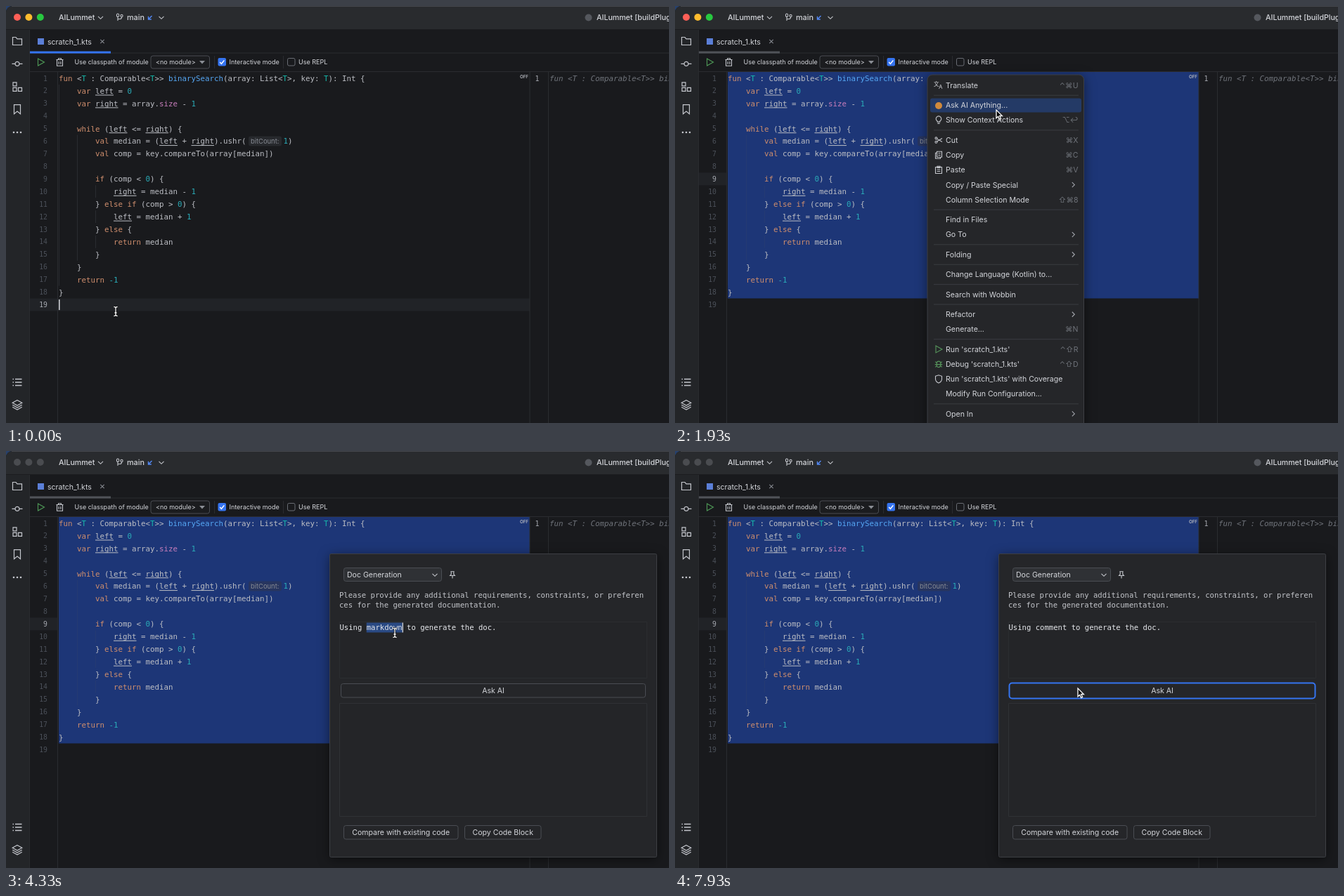
An HTML page with a canvas for the animation above (8 s loop, 943 by 594 pixels).

```html
<!DOCTYPE html>
<html>
<head>
<meta charset="utf-8">
<style>
html, body { margin: 0; width: 100%; height: 100%; overflow: hidden; background: #191a1d; }
canvas { display: block; }
</style>
</head>
<body>
<canvas id="stage" width="943" height="594"></canvas>
<script>
const g = document.getElementById('stage').getContext('2d');
const LOOP = 8000;
const T = { select: 400, menu: 1000, pick: 2070, popup: 2200, click: 3530, word: 4260, erase: 5470, show: 6930, press: 7800 };
const KEYS = [[5730, 'c'], [5800, 'o'], [6330, 'm'], [6400, 'm'], [6600, 'e'], [6730, 'n'], [6870, 't']];
const MOUSE = [[70, 156, 435], [870, 359, 245], [1070, 359, 245], [1800, 457, 148], [2070, 457, 148],
  [2730, 614, 260], [2930, 606, 259], [3600, 561, 259], [3870, 553, 259], [6930, 553, 259], [7600, 573, 338]];
const UI = 'Inter, sans-serif', MONO = '"DejaVu Sans Mono", monospace';
const C = { text: '#d3d5da', dim: '#6f737a', icon: '#c4c6cc', line: '#2a2c30', border: '#4a4d53', blue: '#3574f0',
  green: '#57965c', select: '#1d3677', row: '#212327', panel: '#252629', code: '#bcbec4' };
const COLORS = { kw: '#cf8e6d', num: '#2aacb8', fn: '#56a8f5', type: '#16baac', prop: '#c77dbb' };
const CODE = `fun <T : Comparable<T>> binarySearch(array: List<T>, key: T): Int {
    var left = 0
    var right = array.size - 1

    while (left <= right) {
        val median = (left + right).ushr(1)
        val comp = key.compareTo(array[median])

        if (comp < 0) {
            right = median - 1
        } else if (comp > 0) {
            left = median + 1
        } else {
            return median
        }
    }
    return -1
}`.split('\n');
const TOKEN = /(?<kw>\b(?:fun|var|val|while|if|else|return)\b)|(?<num>-?\b\d+)|(?<fn>binarySearch)|(?<type>\bT\b)|(?<prop>\bsize\b)|(?<mut>\b(?:left|right)\b)|\w+|\s+|[^\w\s]/g;
const CH = 6.5, LINE = 17.92;
const lineY = n => 103 + (n - 1) * LINE;

const SHAPES = {
  down: 'M-3.5 -1.7L0 1.8L3.5 -1.7',
  right: 'M-1.7 -3.5L1.8 0L-1.7 3.5',
  cross: 'M-2.7 -2.7L2.7 2.7M2.7 -2.7L-2.7 2.7',
  folder: 'M-6.5 -5.5H-2L0 -3.2H6.5V5.5H-6.5Z',
  commit: 'M-7.5 0H-3M3 0H7.5M3 0A3 3 0 1 1 -3 0A3 3 0 1 1 3 0',
  structure: 'M-6 -6H-1V-1H-6ZM-6 1.5H-1V6.5H-6ZM1.5 1.5H6.5V6.5H1.5Z',
  bookmark: 'M-4.5 -6.5H4.5V6.5L0 2.8L-4.5 6.5Z',
  list: 'M-3 -4.5H6.5M-3 0H6.5M-3 4.5H6.5M-6.5 -4.5H-5M-6.5 0H-5M-6.5 4.5H-5',
  layers: 'M0 -6.5L6.8 -2.8L0 1L-6.8 -2.8ZM-6.8 0.3L0 4L6.8 0.3M-6.8 3.3L0 7L6.8 3.3',
  branch: 'M-2.5 -1.5V4.5M-2.5 2H1Q3 2 3 -1M-1 -3.3A1.6 1.6 0 1 0 -4 -3.3A1.6 1.6 0 1 0 -1 -3.3M4.6 -2.6A1.6 1.6 0 1 0 1.4 -2.6A1.6 1.6 0 1 0 4.6 -2.6',
  pull: 'M2.5 -2.5L-2.3 2.3M-2.5 -1.8V2.5H1.8',
  play: 'M-4 -5L5 0L-4 5Z',
  trash: 'M-5 -3.5H5M-2 -3.5V-5.3H2V-3.5M-4 -3.5V5.3H4V-3.5M-1.4 -1V3M1.4 -1V3',
  check: 'M-3 0L-0.8 2.3L3.2 -2.6',
  bulb: 'M-1.8 2.5V1.4A3.8 3.8 0 1 1 1.8 1.4V2.5ZM-1.6 4.7H1.6',
  cut: 'M-3 -2.2L5 2.5M-3 2.2L5 -2.5M-2 -2.7A1.5 1.5 0 1 0 -5 -2.7A1.5 1.5 0 1 0 -2 -2.7M-2 2.7A1.5 1.5 0 1 0 -5 2.7A1.5 1.5 0 1 0 -2 2.7',
  copy: 'M-2.5 -5H4.5V3H-2.5ZM-2.5 -3H-4.5V5H2.5V3M-0.7 -2.5H2.7M-0.7 0.2H2.7',
  paste: 'M-4.5 -4H4.5V5H-4.5ZM-2 -5.2H2V-3H-2ZM-2.3 -0.5H2.3M-2.3 2H2.3',
  bug: 'M-2.7 -1.5Q-2.7 -4 0 -4T2.7 -1.5V1.5Q2.7 4.5 0 4.5T-2.7 1.5ZM-5.3 0.5H5.3M-4.8 -3.5L-2.7 -1.5M4.8 -3.5L2.7 -1.5M-4.8 4.3L-2.7 2.5M4.8 4.3L2.7 2.5',
  shield: 'M-4.5 -4L0 -5.5L4.5 -4V0Q4.5 4 0 5.7Q-4.5 4 -4.5 0Z',
  pin: 'M-2.7 -4.8H2.7M-1.8 -4.8V-0.8L-3.4 1H3.4L1.8 -0.8V-4.8M0 1V5',
  arrow: 'M0 0V11.8L2.7 9.3L4.6 13.6L6.6 12.7L4.7 8.5H8.4Z',
  beam: 'M-2.6 -6.5Q0 -6.5 0 -4.5Q0 -6.5 2.6 -6.5M0 -5V5M-2.6 6.5Q0 6.5 0 4.5Q0 6.5 2.6 6.5M-1.5 2H1.5'
};
for (const k in SHAPES) SHAPES[k] = new Path2D(SHAPES[k]);

function icon(name, x, y, color = C.icon, width = 1.1, fill) {
  g.save();
  g.translate(x, y);
  g.lineWidth = width;
  g.strokeStyle = color;
  if (fill) { g.fillStyle = fill; g.fill(SHAPES[name]); }
  g.stroke(SHAPES[name]);
  g.restore();
}
function text(s, x, y, { size = 10.55, color = C.text, font = UI, style = '', align = 'left' } = {}) {
  g.font = `${style} ${size}px ${font}`;
  g.fillStyle = color;
  g.textAlign = align;
  g.fillText(s, x, y + size * 0.36);
}
function rect(x, y, w, h, color) { g.fillStyle = color; g.fillRect(x, y, w, h); }
function box(x, y, w, h, r, fill, stroke, width = 1) {
  g.beginPath();
  g.roundRect(x, y, w, h, r);
  if (fill) { g.fillStyle = fill; g.fill(); }
  if (stroke) { g.strokeStyle = stroke; g.lineWidth = width; g.stroke(); }
}
function floating(x, y, w, h, r) {
  g.save();
  g.shadowColor = 'rgba(0,0,0,.5)';
  g.shadowBlur = 16;
  g.shadowOffsetY = 3;
  box(x, y, w, h, r, C.panel);
  g.restore();
  box(x, y, w, h, r, null, '#3d3f44');
}
function dot(x, y, r, color) {
  g.beginPath();
  g.arc(x, y, r, 0, 7);
  g.fillStyle = color;
  g.fill();
}
function ring(x, y, r, color, width) {
  g.beginPath();
  g.arc(x, y, r, 0, 7);
  g.lineWidth = width;
  g.strokeStyle = color;
  g.stroke();
}

function drawChrome(t) {
  const focused = t < T.popup;
  rect(0, 0, 943, 594, '#28416b');
  box(0, 0, 960, 620, [9, 0, 0, 0], '#191a1d');
  box(0, 0, 960, 33, [9, 0, 0, 0], '#292b2e');
  rect(8, 0, 935, 1, '#46484d');
  ['#fe5f57', '#febc2e', '#28c840'].forEach((c, i) => dot(16 + i * 16.4, 16, 5, focused ? c : '#4a4c50'));
  const title = { size: 10.6, style: '500' };
  text('AILummet', 75, 16.5, title);
  icon('down', 134.5, 16.5);
  icon('branch', 161.5, 16.5);
  text('main', 172, 16.5, { size: 10.8, style: '500' });
  icon('pull', 205, 16.5, '#548af7', 1.4);
  icon('down', 221, 16.5);
  dot(828.5, 16.5, 5, '#55585e');
  text('AILummet [buildPlug', 840, 16.5, title);

  rect(0, 33, 33, 561, '#232528');
  rect(33, 33, 1, 561, C.line);
  rect(0, 33, 943, 1, '#1c1d20');
  ['folder', 'commit', 'structure', 'bookmark'].forEach((n, i) => icon(n, 16, 50 + i * 32.4, C.icon, 1.2));
  for (let i = -1; i < 2; i++) dot(16 + i * 5, 180, 1.3, C.icon);
  icon('list', 16, 536, C.icon, 1.3);
  icon('layers', 16, 568, C.icon, 1.2);

  rect(45, 46, 9, 9, '#5b7fd8');
  text('scratch_1.kts', 59, 51);
  icon('cross', 137, 50.5, '#85888f');
  rect(34, 66.5, 909, 1, C.line);
  rect(34, 64.5, 115, 3, t < T.menu ? C.blue : '#505359');

  icon('play', 49.5, 80, '#4f9a57');
  icon('trash', 76.5, 80);
  const small = { size: 9 };
  text('Use classpath of module', 97.5, 80, small);
  box(206, 71, 83.5, 18, 3, '#1b1c1f', C.border);
  text('<no module>', 213, 80, small);
  g.beginPath();
  g.moveTo(275, 78); g.lineTo(283, 78); g.lineTo(279, 82.5);
  g.fillStyle = '#8b8e95';
  g.fill();
  rect(296, 71, 1, 18, C.line);
  box(301.5, 74, 11.5, 11.5, 2, C.blue);
  icon('check', 307.2, 80, '#fff', 1.5);
  text('Interactive mode', 317.5, 80, small);
  rect(394, 71, 1, 18, C.line);
  box(400.5, 74.5, 10.5, 10.5, 2, null, '#6a6d74');
  text('Use REPL', 416, 80, small);
  rect(34, 93, 909, 1, C.line);
}

function drawEditor(t) {
  const selected = t >= T.select;
  const current = t < T.select ? 19 : 9;
  rect(34, lineY(current) - 9, selected ? 39 : 711, 18, C.row);
  rect(73, 94, 1, 500, C.line);
  if (selected) rect(75, 94, 670, 322.5, C.select);
  const guide = selected ? '#243a72' : '#292b30';
  rect(75, lineY(2) - 9, 1, LINE * 16, guide);
  rect(101, lineY(6) - 9, 1, LINE * 10, guide);
  for (const n of [10, 12, 14]) rect(127, lineY(n) - 9, 1, LINE, guide);
  for (let n = 1; n <= 19; n++)
    text(n, 59, lineY(n), { size: 9.8, font: MONO, align: 'right', color: n === current ? '#a6a9b0' : '#4b5059' });

  CODE.forEach((src, i) => {
    const y = lineY(i + 1);
    for (const m of src.matchAll(TOKEN)) {
      const kind = Object.keys(m.groups).find(k => m.groups[k]);
      const hinted = src.slice(0, m.index).includes('ushr(');
      const x = 75 + m.index * CH + (hinted ? 53 : 0);
      if (hinted && kind === 'num') {
        box(345, y - 7, 47, 14, 3, selected ? '#27355f' : '#27292d');
        text('bitCount:', 348, y, { size: 9.4, color: '#878b93' });
      }
      text(m[0], x, y, { size: 10.8, font: MONO, color: COLORS[kind] || C.code });
      if (kind === 'mut') rect(x, y + 5.5, m[0].length * CH, 1, C.code);
    }
  });
  if (!selected) rect(75, lineY(19) - 7.5, 1.6, 15, '#ced0d6');

  text('OFF', 743, 100.5, { size: 6.2, style: '600', color: '#b4b7be', align: 'right' });
  rect(744.5, 94, 1, 500, C.line);
  rect(771, 94, 1, 500, C.line);
  text('1', 752.5, 103, { size: 9.8, font: MONO, color: '#a6a9b0' });
  text('fun <T : Comparable<T>> binarySearch', 773, 103, { size: 10.8, font: MONO, style: 'italic', color: C.dim });
}

// label, icon, shortcut; null is a divider
const MENU = [['Translate', 'translate', '⌃⌘U'], null,
  ['Ask AI Anything...', 'ask'], ['Show Context Actions', 'bulb', '⌥↩'], null,
  ['Cut', 'cut', '⌘X'], ['Copy', 'copy', '⌘C'], ['Paste', 'paste', '⌘V'],
  ['Copy / Paste Special', '', '>'], ['Column Selection Mode', '', '⇧⌘8'], null,
  ['Find in Files'], ['Go To', '', '>'], null, ['Folding', '', '>'], null,
  ['Change Language (Kotlin) to...'], null, ['Search with Wobbin'], null,
  ['Refactor', '', '>'], ['Generate...', '', '⌘N'], null,
  ["Run 'scratch_1.kts'", 'play', '⌃⇧R'], ["Debug 'scratch_1.kts'", 'bug', '⌃⇧D'],
  ["Run 'scratch_1.kts' with Coverage", 'shield'], ['Modify Run Configuration...'], null,
  ['Open In', '', '>']];

function drawMenu(mx, my) {
  floating(359, 98, 222.5, 520, 7);
  let y = 113;
  for (const item of MENU) {
    if (!item) {
      rect(368, y - 7.5, 206, 1, '#3a3c41');
      y += 7.2;
      continue;
    }
    const [label, pic, key] = item;
    if (mx > 363 && Math.abs(my - y) < 10.6) box(363, y - 10, 215, 20, 3, '#243a66');
    if (pic === 'translate') {
      text('文', 368, y - 1.5, { size: 7.5, font: '"Noto Sans CJK SC", sans-serif' });
      text('A', 375, y + 2, { size: 8 });
    } else if (pic === 'ask') dot(375, y + 0.5, 5, '#d08a3c');
    else if (pic) icon(pic, 375, y, pic === 'play' || pic === 'bug' ? C.green : C.icon);
    text(label, 385, y);
    if (key === '>') icon('right', 566.5, y, '#a3a6ad');
    else if (key) text(key, 573.5, y, { color: C.dim, align: 'right' });
    y += 21.22;
  }
}

function button(label, x, y, w, focused) {
  if (focused) box(x - 1, y - 1, w + 2, 22, 4, C.panel, C.blue, 2);
  else box(x, y, w, 19.5, 3, C.panel, C.border);
  text(label, x + w / 2, y + 10, { align: 'center' });
}

function drawPopup(t) {
  floating(460.5, 146.5, 465, 432, 2);
  if (t < T.click) box(479, 165.5, 142, 21, 4, C.panel, C.blue, 2);
  else box(480.5, 166.5, 139, 19, 3, '#2f3135', C.border);
  text('Doc Generation', 485, 176.2);
  icon('down', 610, 176.5);
  icon('pin', 635, 176.5);

  const mono = { size: 10.58, font: MONO, color: '#c3c5ca' };
  text('Please provide any additional requirements, constraints, or preferen', 474, 205, mono);
  text('ces for the generated documentation.', 474, 218.8, mono);

  box(474.5, 243.5, 437, 80, 0, '#242528', '#2b2d30');
  const typed = KEYS.filter(k => t >= k[0]);
  const word = t < T.erase ? 'markdown' : typed.map(k => k[1]).join('');
  const step = 6.37, start = 474.5 + 6 * step, end = start + word.length * step;
  if (t >= T.word && t < T.erase) rect(start, 244.5, end - start, 14, '#2a4a84');
  text(`Using ${word} to generate the doc.`, 474.5, 251.5, { ...mono, color: '#e6e8ec' });
  const lastEdit = typed.length ? typed[typed.length - 1][0] : t < T.erase ? T.word : T.erase;
  if (t >= T.click && t < T.press && (t < T.word || (t - lastEdit) % 1000 < 500)) rect(end, 244.5, 1.2, 14, '#e6e8ec');

  button('Ask AI', 476.5, 331.5, 433, t >= T.press);
  if (t < T.word) {
    rect(474, 359.5, 438, 1, '#1f2023');
    rect(474, 520, 438, 1, '#1f2023');
  } else box(474.5, 359.5, 437, 161, 0, '#242528', '#2f3135');
  button('Compare with existing code', 480.5, 533.5, 162.5);
  button('Copy Code Block', 652.5, 533.5, 108.5);
}

function mouseAt(t) {
  let a = MOUSE[0];
  for (const b of MOUSE) {
    if (t < b[0]) {
      const u = Math.max(0, (t - a[0]) / (b[0] - a[0] || 1));
      const e = u * u * (3 - 2 * u);
      return [a[1] + (b[1] - a[1]) * e, a[2] + (b[2] - a[2]) * e];
    }
    a = b;
  }
  return a.slice(1);
}

function drawMouse(t, x, y) {
  if (t >= T.erase && t < T.show) return;
  if (t >= T.menu && t < T.menu + 200) {
    ring(358.5, 245.5, 17.2, '#4fae4c', 2.6);
    ring(358.5, 245.5, 15.8, '#b9d9b6', 0.8);
  }
  const overText = t < T.menu || (t >= T.popup && y > 243 && y < 323);
  if (overText) {
    icon('beam', x, y, '#000', 2.6);
    icon('beam', x, y, '#fff', 1.3);
  } else icon('arrow', x, y, '#fff', 1.3, '#000');
}

function frame(now) {
  const t = now % LOOP;
  const [mx, my] = mouseAt(t);
  drawChrome(t);
  drawEditor(t);
  if (t >= T.menu && t < T.pick) drawMenu(mx, my);
  if (t >= T.popup) drawPopup(t);
  drawMouse(t, mx, my);
  requestAnimationFrame(frame);
}
requestAnimationFrame(frame);
</script>
</body>
</html>
```
